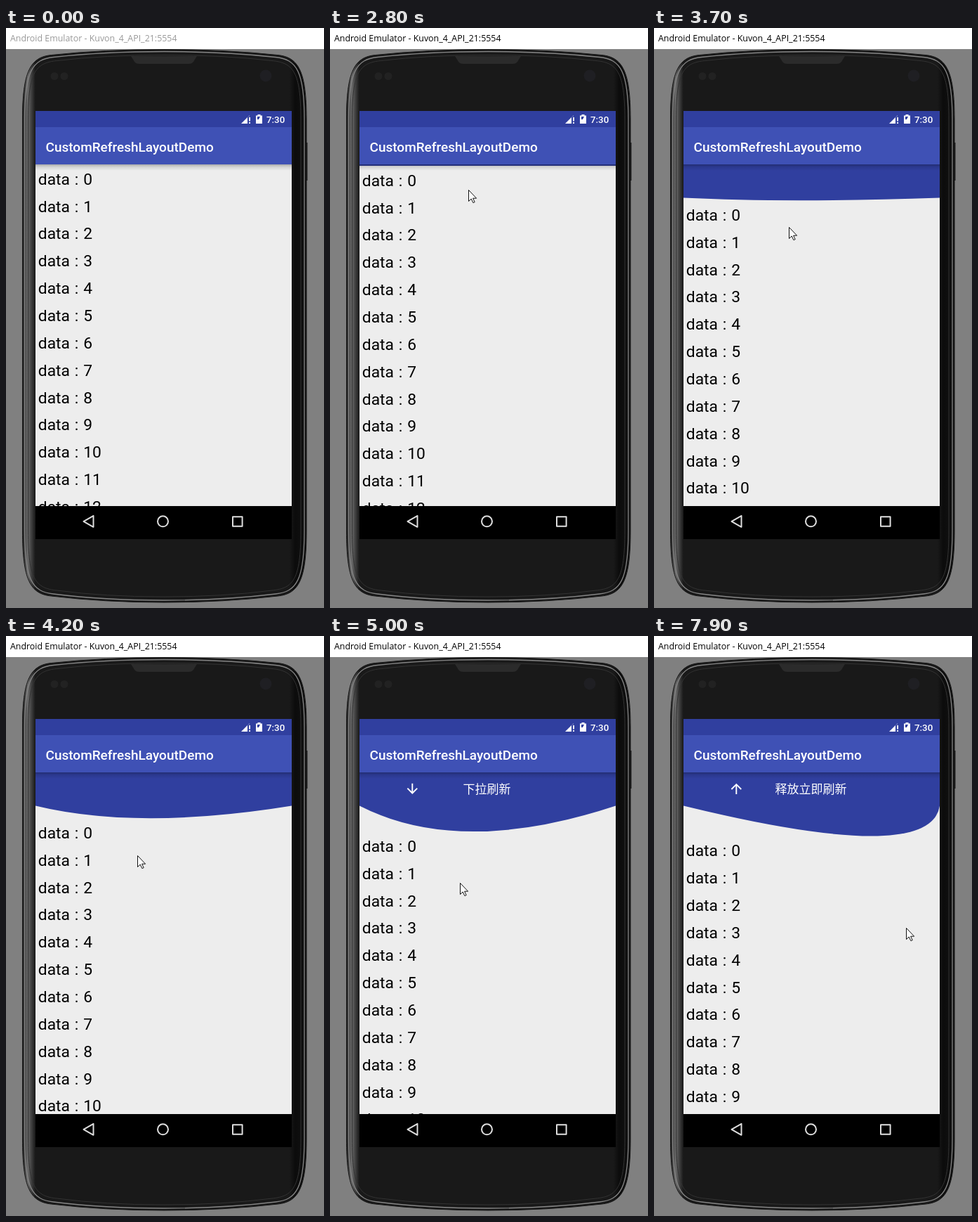
Animation of 453 by 825 pixels, one loop 8000 ms. Source, as an HTML page:

```html
<!DOCTYPE html>
<html lang="zh-CN">
<head>
<meta charset="utf-8">
<style>
html, body { margin: 0; width: 100%; height: 100%; overflow: hidden; background: #808080; }
svg { display: block; width: 453px; height: 825px; font-family: Roboto, sans-serif; }
#rows { font-size: 22.8px; word-spacing: 1.2px; }
#title { font: 12.4px "Open Sans", "Noto Sans", sans-serif; }
#hint { font: 500 17px "Noto Sans CJK SC", "Noto Sans CJK", sans-serif; }
</style>
</head>
<body>
<svg viewBox="0 0 453 825">
  <defs>
    <linearGradient id="shade" x2="0" y2="1">
      <stop stop-color="#000" stop-opacity=".28"/>
      <stop offset=".4" stop-color="#000" stop-opacity=".11"/>
      <stop offset="1" stop-color="#000" stop-opacity="0"/>
    </linearGradient>
    <linearGradient id="side">
      <stop stop-color="#1a1a1a"/>
      <stop offset=".018" stop-color="#6c6c6c"/>
      <stop offset=".03" stop-color="#444"/>
      <stop offset=".045" stop-color="#191919"/>
      <stop offset=".94" stop-color="#191919"/>
      <stop offset=".96" stop-color="#0c0c0c"/>
      <stop offset="1" stop-color="#111"/>
    </linearGradient>
    <clipPath id="view"><path d="M42 194H407V680H42Z"/></clipPath>
  </defs>

  <!-- phone -->
  <path d="M427 163h2.500v54h-2.500z" fill="#222"/>
  <path id="body" fill="url(#side)" stroke="#161616"/>
  <path id="rim" fill="none" stroke="#858585" stroke-width="1.300"/>
  <path id="bevel" fill="none" stroke="#333"/>
  <path d="M178 40H272L267 48Q265 51 260 51H190Q185 51 183 48Z" fill="#2b2b2b"/>
  <g fill="#222">
    <circle cx="69" cy="68.500" r="5.500"/><circle cx="83" cy="68.500" r="5.500"/>
    <circle cx="370" cy="68" r="8.500" fill="#1f1f23"/>
  </g>

  <!-- screen -->
  <path d="M42 118H407V727H42Z"/>
  <g clip-path="url(#view)">
    <path d="M42 194H407V680H42Z" fill="#ededed"/>
    <path id="wave" fill="#303f9f"/>
    <g id="rows"></g>
    <g id="pull" fill="#fff">
      <path id="arrow" d="M20 12l-1.410-1.410L13 16.170V4h-2v12.170l-5.580-5.590L4 12l8 8z"/>
      <text id="hint" x="223.500" y="224.300" text-anchor="middle"></text>
    </g>
    <path d="M42 194H407V203H42Z" fill="url(#shade)"/>
  </g>
  <path d="M42 118H407V141H42Z" fill="#303f9f"/>
  <path d="M42 141H407V194H42Z" fill="#3f51b5"/>
  <g fill="#fff">
    <text x="56.500" y="175.600" font-size="19" font-weight="500">CustomRefreshLayoutDemo</text>
    <text x="371" y="134.700" font-size="13.300" font-weight="500">7:30</text>
    <path d="M335 136L344 127V136Z"/>
    <path d="M344 127L347 124V126H344Z" opacity=".4"/>
    <path d="M346 127h2v5.500h-2zM346 134h2v2h-2z"/>
    <path d="M356 124.500h2.500v-1.500h4v1.500h2.500v11.500h-9z"/>
    <path d="M358 126h4l-2 4h-2z" fill="#303f9f"/>
  </g>
  <g fill="none" stroke="#dedede" stroke-width="2" stroke-linejoin="round">
    <path d="M110.500 701.800L124.500 693.800V709.800Z"/>
    <circle cx="223.500" cy="701.800" r="7.500"/>
    <path d="M323 695.200h13.600v13.600h-13.600z"/>
  </g>

  <!-- window title -->
  <path d="M0 0H453V30H0Z" fill="#fff"/>
  <text id="title" x="6" y="19">Android Emulator - Kuvon_4_API_21:5554</text>
  <path id="cursor" d="M.5 .5v16l3.700-3.500 2.700 5.600 2.300-1-2.600-5.400h5z" fill="#fff" stroke="#111"/>
</svg>
<script>
const $ = id => document.getElementById(id);
const put = (id, attrs) => Object.entries(attrs).forEach(([k, v]) => $(id).setAttribute(k, v));
const clamp = v => Math.min(1, Math.max(0, v));

// outline of the phone, moved inwards by i
function shell(i) {
  const l = 23.5 + i, r = 428 - i, t = 30.5 + i, b = 817 - i;
  return `M${l} 130C${l} 62 ${l + 11} ${t + 11} ${l + 41} ${t + 8}Q140 ${t} 225 ${t}
    T${r - 41} ${t + 8}C${r - 11} ${t + 11} ${r} 62 ${r} 130V715
    C${r} 785 ${r - 11} ${b - 12} ${r - 41} ${b - 9}Q310 ${b} 225 ${b}
    T${l + 41} ${b - 9}C${l + 11} ${b - 12} ${l} 785 ${l} 715Z`;
}
put('body', { d: shell(0) });
put('rim', { d: shell(3) });
put('bevel', { d: shell(8) });

$('rows').innerHTML = Array.from({ length: 13 }, (_, i) =>
  `<text x="45.800" y="${222.7 + i * 38.86}">data : ${i}</text>`).join('');

// pointer moves: start, end, x, y
const moves = [
  [300, 400, 361, 0], [700, 800, 356, 7], [1400, 1800, 231, 189], [1900, 2400, 197, 226],
  [2500, 2800, 197, 230], [2800, 3200, 197, 254], [3200, 4200, 187, 312], [4200, 5000, 185, 351],
  [5000, 5500, 183, 386], [6700, 6800, 158, 392], [6800, 7250, 30, 402],
  [7300, 7800, 394, 418], [7800, 7900, 359, 415]
];
const pointer = t => moves.reduce(([x, y], [from, to, x2, y2]) => {
  const p = clamp((t - from) / (to - from));
  return [x + (x2 - x) * p, y + (y2 - y) * p];
}, [429, 36]);

// the list follows the pull one to one up to EDGE, then lags behind up to LIMIT
const EDGE = 47.5, LIMIT = 90.5;
function stretch(pull) {
  return pull < EDGE ? Math.max(0, pull) : Math.min(LIMIT, EDGE + (pull - EDGE) * .485);
}

function draw(t) {
  const [x, y] = pointer(t), [touch] = pointer(t - 100);
  const shown = t >= 300 && t < 500 || t >= 700;
  put('cursor', { transform: `translate(${Math.round(x)} ${Math.round(y)})`, opacity: +shown });
  put('title', { fill: t < 1100 ? '#999' : '#000' });

  const dist = t < 2500 ? 0 : stretch(y - 228);
  const edge = 194 + Math.min(dist, EDGE), low = edge + 2 * Math.max(0, dist - EDGE);
  put('wave', { d: `M42 194V${edge}Q${touch} ${low} 407 ${edge}V194Z` });
  put('rows', { transform: `translate(0 ${dist})` });

  const turn = 180 * clamp((t - 5200) / 200);
  put('pull', { opacity: +(t >= 4500) });
  put('arrow', { transform: `translate(117.3 217.3) rotate(${turn}) scale(.95) translate(-12 -12)` });
  $('hint').textContent = t < 5300 ? '下拉刷新' : '释放立即刷新';
}

const start = performance.now();
function tick(now) {
  draw(Math.floor(Math.max(0, now - start) % 8000 / 100) * 100);
  requestAnimationFrame(tick);
}
tick(start);
</script>
</body>
</html>
```
